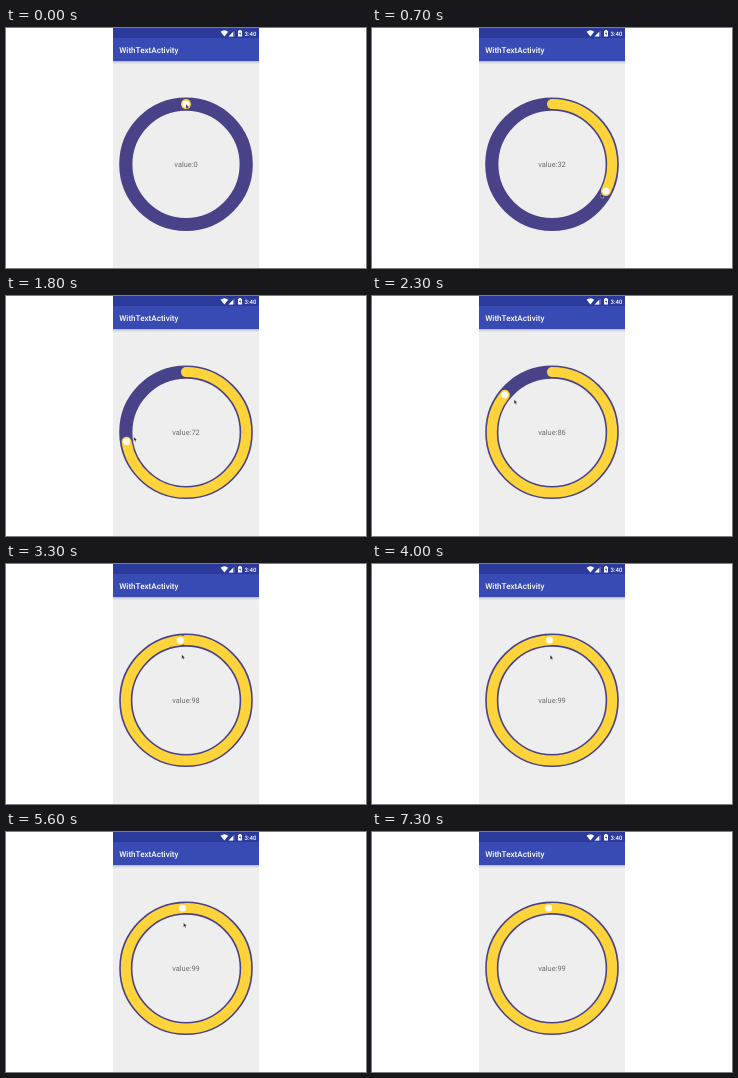
These frames come from a looping animation (360x240 px, 7.5 s). An HTML page:

```html
<!DOCTYPE html>
<html lang="en">
<head>
<meta charset="utf-8">
<title>Circular seek bar</title>
<style>
  html, body { margin: 0; width: 100%; height: 100%; overflow: hidden; background: #fff; }
  svg { display: block; width: 100vw; height: 100vh; }
  text { font-family: Roboto, sans-serif; text-rendering: geometricPrecision; }
  .medium { font-weight: 500; fill: #fff; }
</style>
</head>
<body>
<svg viewBox="0 0 360 240">
  <defs>
    <linearGradient id="shade" x2="0" y2="1">
      <stop stop-color="#b6b9cc"/>
      <stop offset="1" stop-color="#eee"/>
    </linearGradient>
  </defs>
  <rect x="107" width="146" height="240" fill="#eee"/>
  <rect x="107" y="33" width="146" height="3" fill="url(#shade)"/>
  <rect x="107" y="10" width="146" height="23" fill="#384ab4"/>
  <rect x="107" width="146" height="10" fill="#2c3a9c"/>

  <g fill="#fff">
    <path d="M214.6 3.8Q218.4 .8 222.2 3.8L218.4 8.4Z"/>
    <path d="M222.6 8.4L228.6 2.4V8.4Z" opacity=".35"/>
    <path d="M222.6 8.4L227 4V8.4Z"/>
    <path d="M232 2.8H233.1V2H234.9V2.8H236V8.4H232Z"/>
  </g>
  <path d="M234.3 3.6L233 6H234V7.6L235.1 5.2H234.2Z" fill="#2c3a9c"/>
  <text class="medium" x="238.6" y="7.6" font-size="6">3:40</text>
  <text class="medium" x="113.2" y="24.6" font-size="8.1">WithTextActivity</text>

  <g fill="none" transform="translate(180 136.3) rotate(-90)">
    <circle r="60.2" stroke="#484288" stroke-width="13.2"/>
    <circle id="progress" r="60.2" pathLength="100"
            stroke="#ffd43a" stroke-width="10" stroke-linecap="round"/>
  </g>
  <circle id="thumb" r="3.4" fill="#fff"/>
  <text id="label" x="180" y="139.1" font-size="7.4" text-anchor="middle" fill="#6c6c6c"></text>
  <path id="cursor" d="M0 0V4.4L1 3.5L1.8 5.1L2.5 4.8L1.8 3.2H3.1Z"
        fill="#222" stroke="#fff" stroke-width=".3"/>
</svg>
<script>
  const LOOP = 7500, STEP = 100, CURSOR_END = 7300;
  const CENTER = { x: 180, y: 136.3 }, RADIUS = 60.2;
  const SWEEP = 3200, NUDGE = 900, OVERSHOOT = 4700;

  const [progress, thumb, label, cursor] =
    ["progress", "thumb", "label", "cursor"].map(id => document.getElementById(id));

  const clamp = v => Math.min(1, Math.max(0, v));

  // One slow sweep, a small nudge, then a short drag past the top and back.
  function dragged(time) {
    const sweep = 1 - (1 - clamp(time / SWEEP)) ** 1.614;
    const nudge = clamp((time - SWEEP) / NUDGE);
    const overshoot = Math.sin(Math.PI / 2 * clamp(1 - Math.abs(time - OVERSHOOT) / NUDGE)) ** 2;
    return 98.4 * sweep + .7 * nudge + 2.7 * overshoot;
  }

  function place(node, percent, radius) {
    const angle = percent / 50 * Math.PI;
    const x = CENTER.x + radius * Math.sin(angle);
    const y = CENTER.y - radius * Math.cos(angle);
    node.setAttribute("transform", `translate(${x.toFixed(2)} ${y.toFixed(2)})`);
  }

  function draw(now) {
    const time = Math.floor(now % LOOP / STEP) * STEP;
    const total = dragged(time);
    const percent = total % 100;
    progress.setAttribute("stroke-dasharray", `${Math.max(percent, .01)} 200`);
    place(thumb, percent, RADIUS);

    // The pointer runs slightly ahead of the thumb and drifts inwards.
    const lead = 1.5 * Math.sin(Math.PI * total / 100);
    place(cursor, total + lead, 44 + 16 * Math.sqrt(clamp(1 - total / 100)));
    cursor.setAttribute("visibility", time < CURSOR_END ? "visible" : "hidden");
    label.textContent = "value:" + Math.round(percent);
  }

  const start = performance.now();
  function tick() {
    draw(performance.now() - start);
    requestAnimationFrame(tick);
  }
  tick();
</script>
</body>
</html>
```
